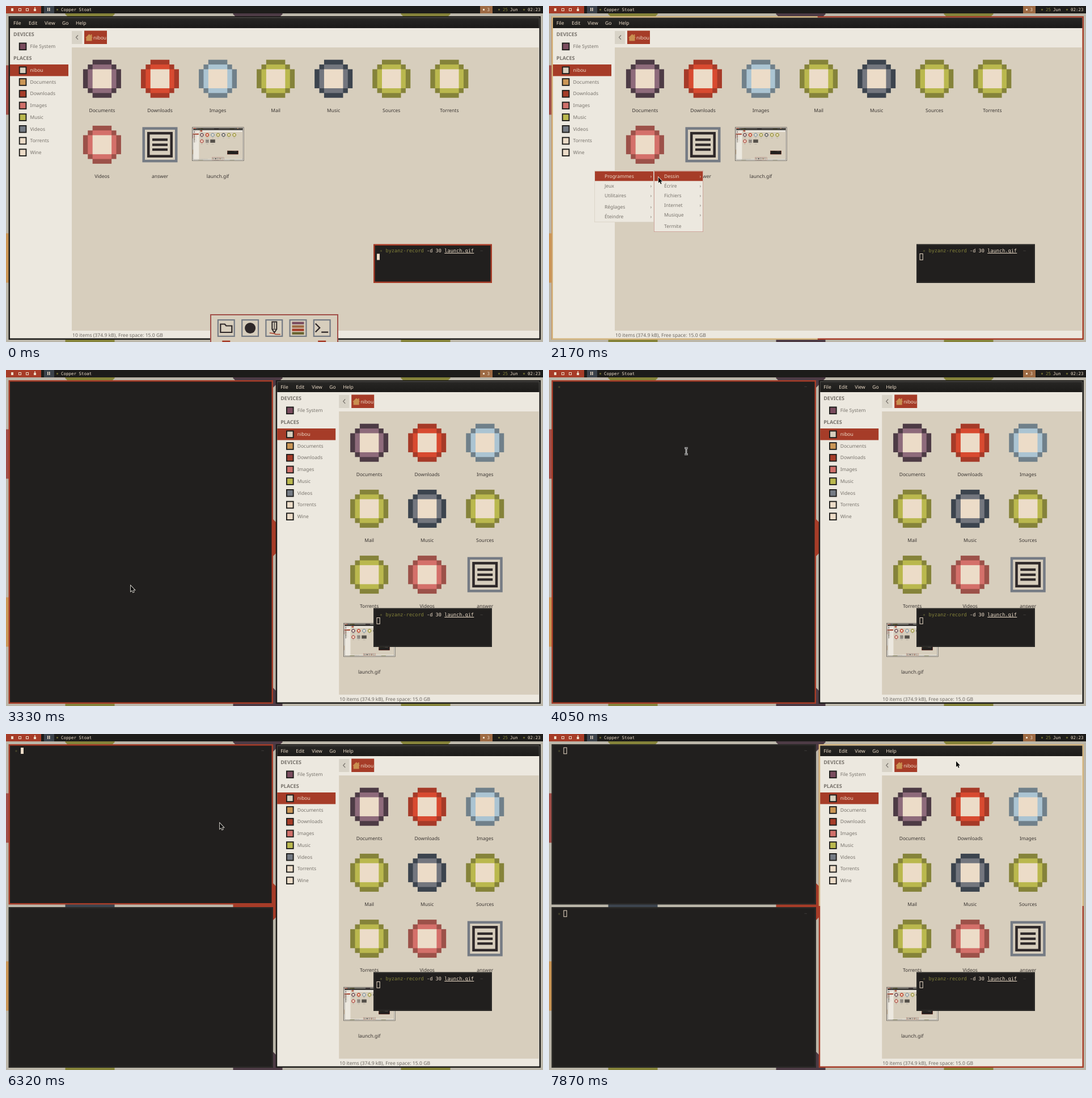
Write an HTML page with a canvas that moves like this. It is 947 px wide and 592 px high and loops after 8000 ms.

```html
<!DOCTYPE html>
<html lang="en">
<head>
<meta charset="utf-8">
<title>Tiling desktop</title>
<style>
html, body { margin: 0; height: 100%; overflow: hidden; background: #bbb6a9; }
canvas { display: block; }
</style>
</head>
<body>
<canvas id="stage" width="947" height="592"></canvas>
<script>
const ctx = document.getElementById('stage').getContext('2d');
const LOOP = 8000;
const SANS = '"Noto Sans", "Open Sans", sans-serif';
const MONO = '"DejaVu Sans Mono", monospace';
const INK = '#211f1e', BAR = '#1d1c1a', PANEL = '#ece8df', SAND = '#d7cebd', CREAM = '#ecdcc8',
  RED = '#a63c28', TAN = '#d4b47c', OLIVE = '#85833a', LIME = '#bab84e', SLATE = '#757b84',
  PLUM = '#4d3b45', GREY = '#78736c', EDGE = '#2a2927', ROSE = '#a14f49', AMBER = '#cb9656', NIGHT = '#3c444e';

const folders = [
  ['Documents', PLUM, '#8e6b7b'], ['Downloads', '#a63a28', '#d84a30'], ['Images', '#70808a', '#abc4d2'],
  ['Mail', OLIVE, LIME], ['Music', NIGHT, '#73767e'], ['Sources', OLIVE, LIME],
  ['Torrents', OLIVE, LIME], ['Videos', '#9c5149', '#d4706a'], ['answer'], ['launch.gif']
];
const places = [
  ['nibou', SAND], ['Documents', AMBER], ['Downloads', RED], ['Images', '#d0706a'],
  ['Music', LIME], ['Videos', SLATE], ['Torrents', CREAM], ['Wine', CREAM]
];
const mainItems = ['Programmes', 'Jeux', 'Utilitaires', 'Réglages', 'Éteindre'];
const subItems = ['Dessin', 'Écrire', 'Fichiers', 'Internet', 'Musique', 'Termite'];

// Pointer waypoints: time, x, y
const pointerPath = [
  [240, 390, 594], [1020, 82, 290], [1550, 82, 290], [1800, 105, 300], [2250, 200, 302], [2690, 220, 380],
  [3770, 220, 380], [4050, 242, 143], [4210, 249, 60], [4430, 249, 56], [4820, 249, 56], [5030, 282, 64],
  [5220, 282, 64], [5500, 372, 69], [5700, 377, 155], [5880, 377, 157], [6700, 377, 157],
  [6980, 560, 210], [7250, 767, 110], [7550, 718, 48]
];

const clamp01 = v => Math.max(0, Math.min(1, v));
const ramp = (t, a, b) => clamp01((t - a) / (b - a));
const between = (t, a, b) => t >= a && t < b;

function pointerAt(t) {
  let i = pointerPath.findIndex(p => p[0] > t);
  if (i < 0) i = pointerPath.length;
  const a = pointerPath[Math.max(0, i - 1)], b = pointerPath[Math.min(i, pointerPath.length - 1)];
  const k = a === b ? 0 : (1 - Math.cos(Math.PI * ramp(t, a[0], b[0]))) / 2;
  return { x: a[1] + (b[1] - a[1]) * k, y: a[2] + (b[2] - a[2]) * k };
}

function box(x, y, w, h, color) {
  ctx.fillStyle = color;
  ctx.fillRect(x, y, w, h);
}
function outline(x, y, w, h, color, width) {
  ctx.strokeStyle = color;
  ctx.lineWidth = width;
  ctx.strokeRect(x + width / 2, y + width / 2, w - width, h - width);
}
function text(s, x, y, color, { size = 8.5, font = SANS, align = 'left', weight = 500 } = {}) {
  ctx.font = `${weight} ${size}px ${font}`;
  ctx.textAlign = align;
  ctx.fillStyle = color;
  ctx.fillText(s, x, y);
}
const mono = (s, x, y, color, size = 8.6) => text(s, x, y, color, { size, font: MONO });

function trace(points, close) {
  ctx.beginPath();
  points.forEach(([x, y]) => ctx.lineTo(x, y));
  if (close) ctx.closePath();
}
function polygon(points, color) {
  trace(points, true);
  ctx.fillStyle = color;
  ctx.fill();
}
function line(points, color, width, close) {
  trace(points, close);
  ctx.strokeStyle = color;
  ctx.lineWidth = width;
  ctx.stroke();
}

function octagon(cx, cy, color) {
  const r = 43.5, s = 16;
  polygon([[-s, -r], [s, -r], [r, -s], [r, s], [s, r], [-s, r], [-r, s], [-r, -s]]
    .map(([x, y]) => [cx + x, cy + y]), color);
}
function wallpaper() {
  box(0, 0, 947, 592, '#bbb6a9');
  const rows = [[OLIVE, PLUM, OLIVE], [NIGHT, RED, NIGHT], [OLIVE, PLUM, OLIVE]];
  rows.forEach((row, j) => row.forEach((c, i) => octagon(148 + 296 * i, 297 * j - 1.5, c)));
  octagon(0, 148, ROSE);
  octagon(0, 444, AMBER);
}

function topBar() {
  box(0, 0, 947, 13, BAR);
  box(0, 0, 62, 13, RED);
  box(9, 4, 4, 5, CREAM);
  outline(22, 4, 5, 5, CREAM, 1);
  outline(35, 4, 5, 5, CREAM, 1);
  box(49, 5, 4, 4, CREAM);
  box(50, 2.5, 2, 2, CREAM);
  box(67, 0, 18, 13, '#3b424b');
  box(73, 3, 1.5, 6, CREAM);
  box(76, 3, 1.5, 6, CREAM);
  box(836, 0, 22, 13, '#9d6a44');
  box(841, 5, 3, 3, CREAM);
  [89, 868, 912].forEach(x => box(x, 5, 3, 3, '#5f5c2c'));
  mono('Copper Stoat', 97, 9, CREAM, 7.5);
  mono('3', 848.5, 9, CREAM, 7.5);
  mono('25', 876, 9, OLIVE, 7.5);
  mono('Jun', 889, 9, CREAM, 7.5);
  mono('02:23', 920, 9, CREAM, 7.5);
}

// Window border; "split" tints the half reserved for the next window
function frame(x, y, w, h, color, split) {
  box(x, y, w, h, color);
  if (split === 'left') box(x, y, w / 2, h, TAN);
  if (split === 'top') box(x, y, w, h / 2, TAN);
}

function folderIcon(cx, cy, dark, light) {
  const u = 8.375, x = cx - 4 * u, y = cy - 4 * u;
  const cells = (c, r, w, h, color) => box(x + c * u, y + r * u, w * u, h * u, color);
  cells(2, 0, 4, 8, dark);
  cells(1, 1, 6, 6, dark);
  cells(0, 2, 8, 4, dark);
  cells(2, 1, 4, 6, light);
  cells(1, 2, 6, 4, light);
  cells(2, 2, 4, 4, CREAM);
}
function documentIcon(cx, cy) {
  outline(cx - 31, cy - 31, 62, 62, SLATE, 4.5);
  outline(cx - 22.5, cy - 22.5, 45, 45, '#2e2829', 4.5);
  [-11, -2, 6.5].forEach(dy => box(cx - 13.5, cy + dy, 27, 4.3, '#2e2829'));
}
// Miniature of the whole desktop, clipped to its own edges
function thumbnail(cx, cy, nested) {
  box(cx - 45.5, cy - 31, 91.5, 59.5, '#55504a');
  if (nested) return;
  box(cx - 44.7, cy - 30.2, 90, 58, PANEL);
  ctx.save();
  ctx.translate(cx - 44, cy - 29.5);
  ctx.scale(0.0935, 0.0953);
  ctx.beginPath();
  ctx.rect(0, 0, 947, 592);
  ctx.clip();
  desktop(0, true);
  ctx.restore();
}

function fileWindow(x, border, split, nested) {
  const right = 943, dx = x - 4.5;
  frame(x, 18, right - x, 570, border, split);
  box(x + 2.5, 20.5, right - x - 5, 565, PANEL);
  const shade = ctx.createLinearGradient(0, 20, 0, 39);
  shade.addColorStop(0, '#282725');
  shade.addColorStop(1, '#1c1b19');
  box(x + 2.5, 20.5, right - x - 5, 18.5, shade);
  ctx.save();
  ctx.translate(dx, 0);
  [['File', 13], ['Edit', 40], ['View', 68], ['Go', 99], ['Help', 123]]
    .forEach(([s, tx]) => text(s, tx, 33, CREAM));
  box(116, 73, 939.5 - 116 - dx, 499, SAND);

  text('DEVICES', 13, 53, GREY, { weight: 'bold', size: 9 });
  text('PLACES', 13, 95, GREY, { weight: 'bold', size: 9 });
  box(7, 103, 103, 20.5, RED);
  const place = (label, color, cy, ink) => {
    box(22.8, cy - 6.5, 13.6, 13.6, BAR);
    box(24.7, cy - 4.6, 9.8, 9.8, color);
    text(label, 42.5, cy + 3, ink);
  };
  place('File System', '#7a4c5e', 71, GREY);
  places.forEach(([label, color], i) => place(label, color, 113 + 20.7 * i, i ? GREY : CREAM));

  box(116, 44, 18, 23, '#d8d3c7');
  line([[127, 51.5], [123.5, 55.3], [127, 59]], GREY, 1.2);
  box(138, 43.5, 40, 23.5, RED);
  polygon([[140, 56], [146.5, 49.5], [149.5, 52], [149.5, 50], [151.5, 50], [151.5, 54.5], [153, 56],
    [151.5, 56], [151.5, 61.5], [141.5, 61.5], [141.5, 56]], '#c98f50');
  text('nibou', 154, 58.5, CREAM);
  text('10 items (374.9 kB), Free space: 15.0 GB', 117, 582.5, '#6d6862', { size: 8.65 });

  const columns = dx > 100 ? 3 : 7;
  folders.forEach(([label, dark, light], i) => {
    const cx = 169.4 + 102.07 * (i % columns), cy = 128.2 + 116.2 * Math.floor(i / columns);
    if (dark) folderIcon(cx, cy, dark, light);
    else if (label === 'answer') documentIcon(cx, cy);
    else thumbnail(cx, cy, nested);
    text(label, cx, cy + 58.3, '#3a3532', { align: 'center' });
  });
  ctx.restore();
}

function terminal(x, y, w, h, { focused, split, prompt = true, cursor = focused ? 'solid' : 'hollow' }) {
  frame(x, y, w, h, focused ? RED : EDGE, split);
  box(x + 2.5, y + 2.5, w - 5, h - 5, INK);
  if (!prompt) return;
  box(x + 12, y + 10.5, 3, 3, '#44422a');
  mono('~', x + w - 21, y + 14, '#4a4744');
  if (cursor) blockCursor(x + 21, y + 5.5, cursor);
}
function blockCursor(x, y, style) {
  if (style === 'solid') box(x + 0.5, y + 0.5, 5, 11, CREAM);
  else outline(x, y, 6.2, 11.8, CREAM, 1);
}
function recorder(focused) {
  terminal(648, 419.5, 209, 68.5, { focused, cursor: null });
  mono('byzanz-record', 669.5, 434, OLIVE);
  mono('-d 30', 742, 434, CREAM);
  mono('launch.gif', 773.3, 434, CREAM);
  box(773.3, 435, 52, 1, CREAM);
  blockCursor(653.5, 436, focused ? 'solid' : 'hollow');
}

function dock(y) {
  box(360, y, 226, 60, ROSE);
  box(362, y + 2, 222, 60, SAND);
  const dark = '#2e2829', cy = y + 24.5;
  const around = (cx, points) => points.map(([px, py]) => [cx + px, cy + py]);
  const centers = [388.3, 430.6, 472.8, 515, 557.2];
  const [files, browser, pen, bars, shell] = centers;
  centers.forEach(cx => outline(cx - 15.5, cy - 15.5, 31, 31, SLATE, 2.2));

  line(around(files, [[-10, -7], [-2.5, -7], [0, -4], [10, -4], [10, 7.5], [-10, 7.5]]), dark, 2.2, true);
  ctx.beginPath();
  ctx.arc(browser, cy, 9.5, 0, 7);
  ctx.fillStyle = dark;
  ctx.fill();
  line(around(pen, [[-3.5, -11], [4.5, -11], [4.5, 2], [0.5, 8], [-3.5, 2]]), dark, 2, true);
  line(around(pen, [[0.5, -10], [0.5, 1]]), dark, 1.2);
  line(around(pen, [[-3, 2], [4, 2]]), dark, 1.2);
  line(around(pen, [[-8, 8.5], [0, 9.5], [3, 11], [11, 11]]), RED, 1.7);
  ['#7a4c5e', '#9d6a44', RED, '#68622e'].forEach((c, i) => box(bars - 10.5, cy - 11 + 6 * i, 21, 4.3, c));
  line(around(shell, [[-11.5, -8], [-4, -0.5], [-11.5, 7]]), dark, 2.3);
  box(shell - 1, cy + 6, 12, 2.3, dark);
  [files, shell].forEach(cx => box(cx - 7, y + 46.5, 14, 3, RED));
}

function menu(x, y, w, items, gapBefore, active, border) {
  const h = items.length * 17 + 6;
  box(x, y, w, h, border);
  box(x + 0.8, y + 0.8, w - 1.6, h - 1.6, PANEL);
  items.forEach((label, i) => {
    const cy = rowCenter(y, i, gapBefore), on = i === active;
    if (on) box(x + 1, cy - 8.7, w - 2, 17, RED);
    text(label, x + 18, cy + 3, on ? CREAM : GREY);
    if (label !== 'Termite') text('›', x + w - 6.5, cy + 2.5, on ? CREAM : GREY);
  });
}
const rowCenter = (y, i, gapBefore) => y + 10 + 17 * i + (i >= gapBefore ? 3 : 0);
function rootMenu(x, y, pointer, subOpen) {
  const rowAt = (items, gap) => items.findIndex((_, i) => Math.abs(pointer.y - rowCenter(y, i, gap)) <= 8.5);
  menu(x, y, 105, mainItems, 3, subOpen ? 0 : rowAt(mainItems, 3), '#d9d0c4');
  if (subOpen) menu(x + 105, y, 87, subItems, 5, pointer.x >= x + 105 ? rowAt(subItems, 5) : -1, '#c9968c');
}

function drawPointer({ x, y }, beam) {
  if (beam) {
    const shape = [[x - 3, y - 5.5], [x + 3, y - 5.5], [x, y - 5.5], [x, y + 5.5], [x - 3, y + 5.5], [x + 3, y + 5.5]];
    line(shape, '#fff', 2.6);
    line(shape, '#111', 0.8);
    return;
  }
  const arrow = [[0, 0], [0, 10], [2.3, 8], [4, 11.8], [5.6, 11.1], [4, 7.4], [7, 7.4]].map(([px, py]) => [x + px, y + py]);
  line(arrow, '#f4f0e8', 1.6, true);
  polygon(arrow, '#0a0a0a');
}

function desktop(t, nested) {
  const pointer = pointerAt(t);
  const tiled = t >= 3330, stacked = t >= 6320, onFiles = pointer.x >= 474;
  const firstMenu = between(t, 1470, 3090), secondMenu = between(t, 4780, 6060);
  wallpaper();
  topBar();

  const filesFocused = tiled ? onFiles : t >= 470;
  const fileSplit = between(t, 1280, 3330) ? 'left' : t >= 7870 ? 'top' : null;
  fileWindow(tiled ? 475.7 : 4.5, filesFocused ? RED : BAR, fileSplit, nested);
  if (tiled) {
    terminal(4.5, 18, 466.5, stacked ? 282.5 : 570, {
      focused: !onFiles,
      split: between(t, 4620, 6320) ? 'top' : null,
      prompt: t >= 3440,
      cursor: t < 4090 ? null : secondMenu || onFiles ? 'hollow' : 'solid'
    });
  }
  if (stacked) terminal(4.5, 305, 466.5, 283, { focused: false, prompt: t >= 6480 });
  recorder(t < 470);

  const raised = t < 1000 ? 1 - ramp(t, 480, 760) : ramp(t, 6500, 6655) - ramp(t, 7180, 7420);
  if (raised > 0) dock(594 - 51 * raised);
  if (firstMenu) rootMenu(80, 290, pointer, t >= 1750);
  if (secondMenu) rootMenu(247, 55, pointer, t >= 4990);
  const beam = between(t, 3790, 4780) || (t > 6720 && !onFiles);
  if (!nested) drawPointer(pointer, beam);
}

function tick() {
  ctx.textRendering = 'geometricPrecision';
  desktop(performance.now() % LOOP, false);
  requestAnimationFrame(tick);
}
tick();
</script>
</body>
</html>
```
